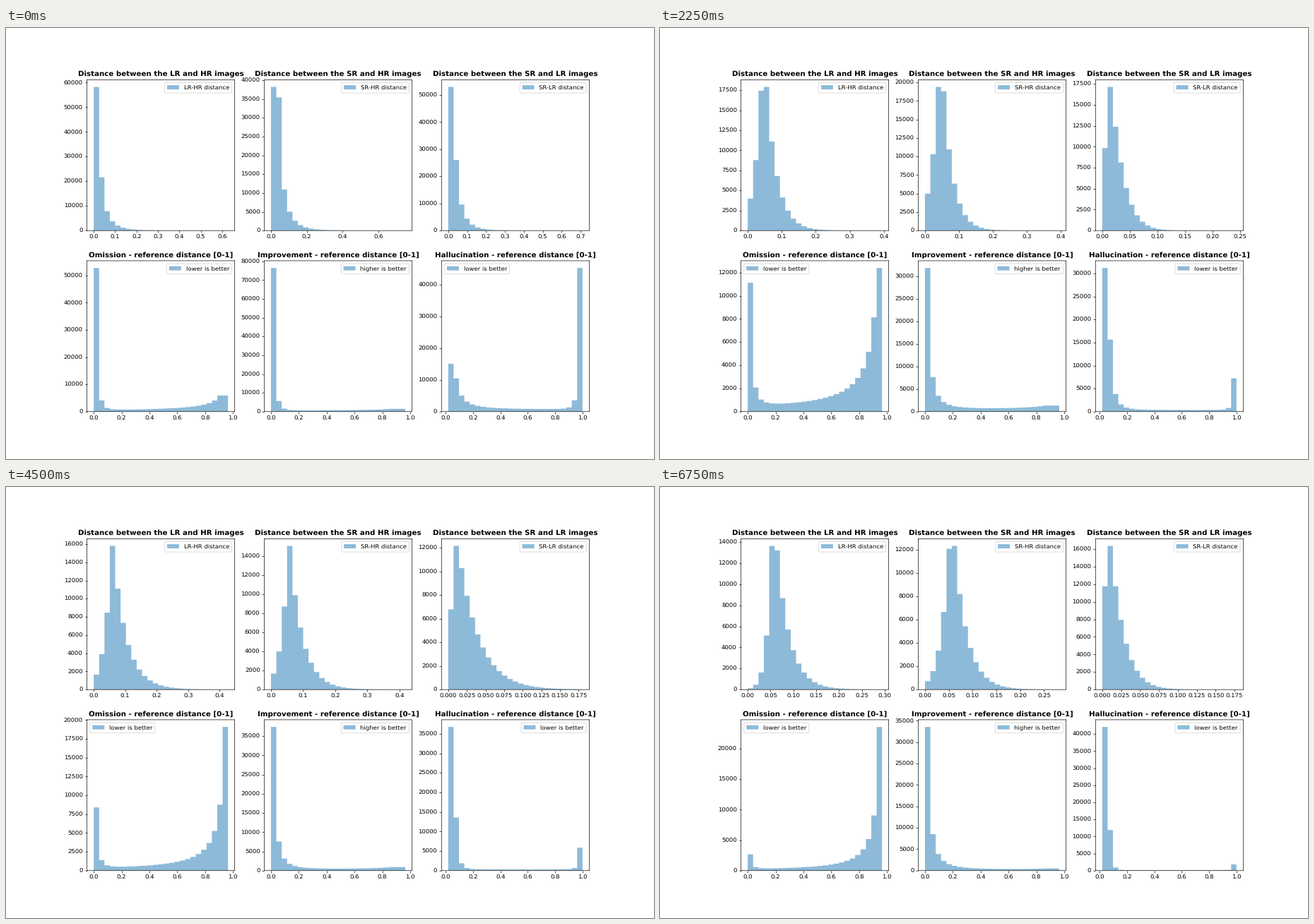
These frames come from a looping animation (917 px wide and 611 px high, 7500 ms). A matplotlib script:

```python
import matplotlib.pyplot as plt
import numpy as np
from matplotlib.animation import FuncAnimation

DPI = 61.13
STEPS = 10
KEYS = [0, 1, 2, 4, 5, 7, 9]   # steps with a key pose; the others lie between
BIN = np.arange(25)

plt.rcParams.update({"text.hinting": "none", "path.snap": False})


def hump(end, peak, mode, rise, fall, bend):
    """Single peak: steep climb up to the mode, stretched decay after it."""
    before = np.clip(mode - BIN, 0, None)
    after = np.clip(BIN - mode, 0, None)
    h = np.exp(-rise * before ** 1.2 - fall * after ** bend)
    return 0, end, peak * h / h.max()


def decay(n, flat, power):
    """Power law that stays at 1 up to the distance flat."""
    return np.minimum(1, (n / flat) ** -power)


def valley(left, drop, right, flat, climb):
    """Spike on the left, slow climb to the right end."""
    h = left * decay(BIN + 1, 1, drop) + right * decay(25 - BIN, flat, climb)
    return 0, .9645, h


def slide(left, drop, right):
    return valley(left, drop, right, 3, .5)


def spikes(left, drop, right, floor):
    """Bars at both ends over a flat floor."""
    h = floor + left * decay(BIN + 1, 1.65, drop) + right * decay(25 - BIN, 1, 4)
    return .018, 1, h


# Key poses: the arguments of each panel's curve, heights in thousands
LR_HR = [
    (.627, 58.28, .55, 0, 1.6, .6),
    (.396, 25.18, 2, .6, .9, .8),
    (.417, 13.63, 3, .53, .18, 1.3),
    (.372, 22.18, 2, .62, .74, .78),
    (.226, 14.07, 4, .4, .385, .98),
    (.627, 17.54, 2.2, .78, .48, .95),
    (.294, 13.63, 4.35, .85, .42, 1),
]
SR_HR = [
    (.75, 38.2, .9, .27, 1.4, .65),
    (.383, 26.99, 2, .66, .92, .82),
    (.415, 13.8, 3, .4, .26, 1.2),
    (.376, 25, 2, .66, .8, .84),
    (.2375, 13.9, 3.6, .46, .39, 1),
    (.598, 16.2, 2.3, .75, .45, 1),
    (.282, 12.33, 4.5, .5, .4, 1.02),
]
SR_LR = [
    (.71, 53, .6, 0, 1.35, .7),
    (.2436, 25, 1, .45, .68, 1),
    (.2565, 13.16, 1, .69, .13, 1.4),
    (.231, 21.14, 1, .42, .52, 1),
    (.0954, 11.37, 1.25, 1, .2, 1.08),
    (.265, 12.95, 1, .09, .29, 1),
    (.1776, 16.36, 1, .33, .33, 1.13),
]
OMISSION = [
    (52.2, 3.9, 5.9, 2, .92),
    (9.3, 2.7, 12.11, 1.6, 1.1),
    (11.3, 2.8, 13.05, 1.15, 1.1),
    (10, 2.7, 11.76, 1.6, 1.15),
    (7.5, 3, 18.88, 1.15, 1.27),
    (8.55, 3, 19.3, 1, 1.24),
    (2.4, 3, 23.58, 1, 1.38),
]
IMPROVEMENT = [
    (76, 3.9, 1.5), (33.3, 1.9, .9), (30.5, 2.2, 1.45), (32.4, 2.05, 1.15),
    (37.6, 2.3, .85), (36.6, 2.4, .95), (33.4, 2, .45),
]
HALLUCINATION = [
    (14.4, 2, 44.6, .7), (29.9, 3.2, 6.5, .35), (32, 4, 7.1, .35), (29.7, 3.3, 6.65, .35),
    (37.1, 5.2, 5.2, .3), (35.8, 5.3, 5.9, .3), (42, 6.6, 1.7, .1),
]

PANELS = [
    ("Distance between the LR and HR images", "LR-HR distance", hump, LR_HR),
    ("Distance between the SR and HR images", "SR-HR distance", hump, SR_HR),
    ("Distance between the SR and LR images", "SR-LR distance", hump, SR_LR),
    ("Omission - reference distance [0-1]", "lower is better", valley, OMISSION),
    ("Improvement - reference distance [0-1]", "higher is better", slide, IMPROVEMENT),
    ("Hallucination - reference distance [0-1]", "lower is better", spikes, HALLUCINATION),
]

# The small surplus keeps the pixel size from rounding down
fig, axes = plt.subplots(2, 3, figsize=(917.01 / DPI, 611.01 / DPI), dpi=DPI)


def pose(keys, step):
    return [np.interp(step, KEYS, column) for column in zip(*keys)]


def draw(step):
    for ax, (title, label, curve, keys) in zip(axes.flat, PANELS):
        ax.clear()
        start, end, heights = curve(*pose(keys, step))
        edges = np.linspace(start, end, 26)
        mids = (edges[:-1] + edges[1:]) / 2
        ax.hist(mids, edges, weights=1000 * heights, histtype="stepfilled",
                alpha=.5, label=label)
        ax.set_title(title, weight="bold")
        # The legend avoids the taller end of the two-sided panels
        crowded = curve in (valley, spikes) and heights[-1] > heights[0]
        ax.legend(loc="upper left" if crowded else "upper right")


anim = FuncAnimation(fig, draw, frames=STEPS, interval=750, repeat=True, repeat_delay=0)
plt.show()
```
